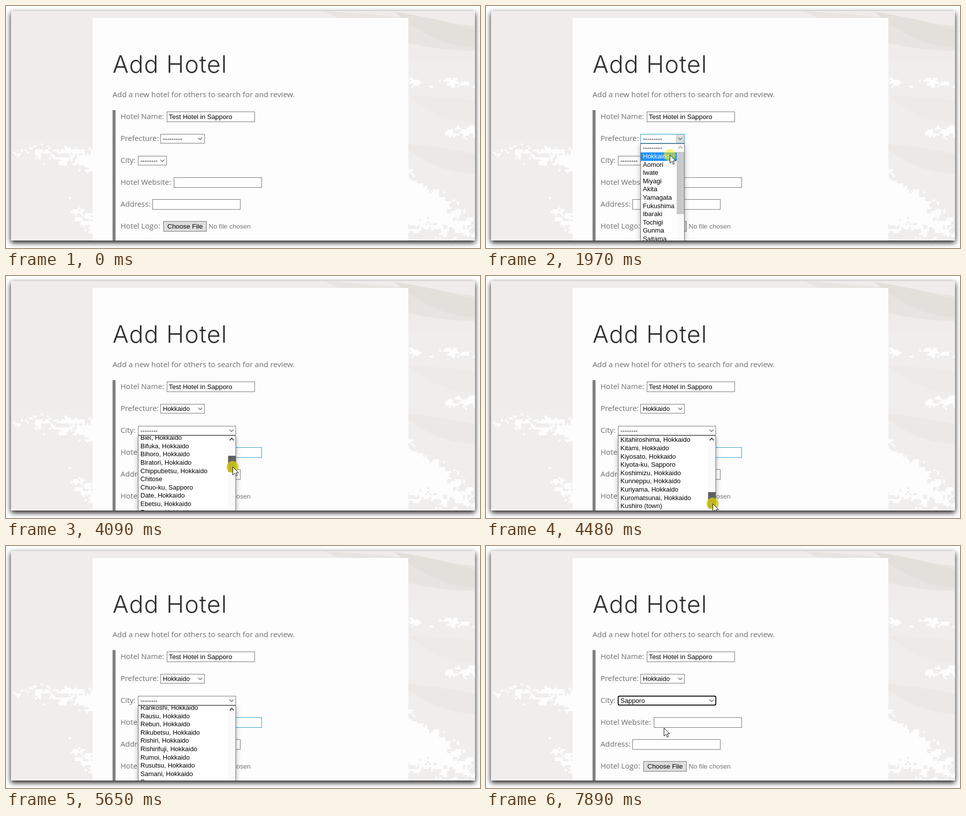
Write an HTML page with a canvas that moves like this. It is 952 px wide and 486 px high and loops after 8000 ms.

```html
<!DOCTYPE html>
<html lang="en">
<head>
<meta charset="utf-8">
<title>Add Hotel</title>
<style>
html, body { margin: 0; width: 100%; height: 100%; overflow: hidden; background: #fff; }
canvas { display: block; width: 952px; height: 486px; }
</style>
</head>
<body>
<canvas id="stage" width="952" height="486"></canvas>
<script>
const W = 952, H = 486, LOOP = 8000;
const ctx = document.getElementById('stage').getContext('2d');
const ARIAL = '"Liberation Sans", Arial, sans-serif';
const UI = '13.333px ' + ARIAL, LIST = '13px ' + ARIAL;
const BODY = '"Open Sans", "Noto Sans", sans-serif';
const ROW = 16.6, SHOWN = 20, BOTTOM = 471;
const BORDER = '#767676', HOVER = '#3399cc', PICK = '#1e90ff';

const prefectures = ('---------,Hokkaido,Aomori,Iwate,Miyagi,Akita,Yamagata,Fukushima,' +
  'Ibaraki,Tochigi,Gunma,Saitama,Chiba').split(',');

// A trailing dot marks a name shown without its region.
const cities = ('--------.,Abashiri.,Abira,Aibetsu,Akabira,Akaigawa,Akkeshi,Asahikawa.,Ashibetsu,' +
  'Ashoro,Assabu,Atsubetsu-ku,Atsuma,Betsukai,Bibai,Biei,Bifuka,Bihoro,Biratori,Chippubetsu,' +
  'Chitose.,Chuo-ku,Date,Ebetsu,Engaru,Eniwa,Erimo,Esashi,Fukagawa,Fukushima,Furano,Furubira,' +
  'Haboro,Hakodate.,Hamanaka,Hamatonbetsu,Hidaka,Higashi-ku,Higashikagura,Higashikawa,Hiroo,' +
  'Hokuryu,Hokuto,Honbetsu,Horokanai,Horonobe,Ikeda,Imakane,Ishikari,Iwamizawa,Iwanai,' +
  'Kamifurano,Kamikawa,Kaminokuni,Kamishihoro,Kamisunagawa,Kamoenai,Kembuchi,Kikonai,Kimobetsu,' +
  'Kita-ku,Kitahiroshima,Kitami,Kiyosato,Kiyota-ku,Koshimizu,Kunneppu,Kuriyama,Kuromatsunai,' +
  'Kushiro (town).,Kushiro.,Kutchan,Kyogoku,Kyowa,Makkari,Mashike,Matsumae,Memuro,Mikasa,' +
  'Minami-ku,Minamifurano,Mombetsu,Mori,Moseushi,Mukawa,Muroran.,Naganuma,Naie,Nakafurano,' +
  'Nakagawa,Nakasatsunai,Nakashibetsu,Nakatombetsu,Namporo,Nanae,Nayoro,Nemuro,Niikappu,Niki,' +
  'Niseko,Nishi-ku,Nishiokoppe,Noboribetsu,Numata,Obihiro,Obira,Oketo,Okoppe,Okushiri,omu,' +
  'Oshamambe,Otaru.,Otobe,Otofuke,Otoineppu,Ozora,Pippu,Rankoshi,Rausu,Rebun,Rikubetsu,' +
  'Rishiri,Rishirifuji,Rumoi,Rusutsu,Samani,Sapporo.,Sarabetsu,Saroma,Sarufutsu,Setana,' +
  'Shakotan,Shari,Shibecha,Shibetsu').split(',').map(c =>
    c.endsWith('.') ? c.slice(0, -1) : c + (c.endsWith('-ku') ? ', Sapporo' : ', Hokkaido'));
const cityRow = name => cities.findIndex(c => c.startsWith(name));
const CITY_COUNT = 187;

const tickAt = t => t < 400 ? 0 : Math.floor((t - 390) / 131.4) + 1;

// Key points: tick, then the values reached there
const cursorIn = [[1, 665, 448], [6, 373, 265], [10, 369, 289], [13, 369, 299], [16, 369, 299],
  [19, 472, 309], [20, 455, 312], [21, 455, 312], [28, 455, 359]];
const cursorOut = [[49, 257, 433], [53, 284, 372], [57, 284, 372], [58, 357, 365]];
const scrolling = [[28, 0], [32, cityRow('Kitahiroshima')], [37, cityRow('Obira') - .36],
  [43, cityRow('Rusutsu') - .42]];

function along(keys, n, col = 1) {
  const i = keys.findIndex(k => k[0] >= n);
  if (i < 0) return keys[keys.length - 1][col];
  if (i === 0) return keys[0][col];
  const a = keys[i - 1], b = keys[i];
  return a[col] + (b[col] - a[col]) * (n - a[0]) / (b[0] - a[0]);
}

const thumbShift = scroll => 268 * scroll / (CITY_COUNT - SHOWN);

function cursorAt(n) {
  if (n < 1) return null;
  if (n <= 28) return [along(cursorIn, n), along(cursorIn, n, 2)];
  if (n < 49) return n < 36 ? [455, 359 + thumbShift(along(scrolling, n))] : null;
  return [along(cursorOut, n), along(cursorOut, n, 2)];
}

function box(c, x, y, w, h, fill, line) {
  c.fillStyle = fill;
  c.fillRect(x, y, w, h);
  if (!line) return;
  c.strokeStyle = line;
  c.lineWidth = 1;
  c.strokeRect(x + .5, y + .5, w - 1, h - 1);
}

function text(c, str, x, y, font = UI, color = '#000') {
  c.font = font;
  c.fillStyle = color;
  c.fillText(str, x, y);
}

function chevron(x, y, dir, color, width = 1.5) {
  ctx.strokeStyle = color;
  ctx.lineWidth = width;
  ctx.beginPath();
  ctx.moveTo(x - 4, y - 2 * dir);
  ctx.lineTo(x, y + 2 * dir);
  ctx.lineTo(x + 4, y - 2 * dir);
  ctx.stroke();
}

function hash(x, y) {
  const s = Math.sin(x * 127.1 + y * 311.7) * 43758.5453;
  return s - Math.floor(s);
}

const bell = (d, s) => Math.exp(-((d / s) ** 2));

// How much white paint shows through on each side of the form
function paint(x, y) {
  if (x < 174) {
    const u = (x - 10) / 164;
    return bell(y - 285 - 25 * u, 27) * (.4 + .55 * u) + u * u * bell(y - 320 - 115 * u, 34);
  }
  const v = (x - 808) / 134;
  return .6 * bell(y - 152, 14) + v * bell(y - 252, 17) +
    (1.25 - .6 * v) * bell(y - 390 - 55 * v, 64 - 26 * v);
}

// A soft brush band running from the left x to the window's right edge
function band(c, x, y, drop, thick, color) {
  c.fillStyle = color;
  c.beginPath();
  c.moveTo(x, y);
  c.quadraticCurveTo((x + 942) / 2, y + drop * .3, 942, y + drop);
  c.lineTo(942, y + drop + thick);
  c.quadraticCurveTo((x + 942) / 2, y + drop + thick, x, y);
  c.fill();
}

function wall(c) {
  box(c, 0, 0, W, H, '#efeceb');
  box(c, 10, 270, 164, 201, '#f0eeed');
  box(c, 808, 110, 134, 361, '#f0eeed');
  band(c, 640, 10, 30, 50, '#e8e4e1');
  band(c, 780, 12, 36, 34, '#e3dfdb');
  band(c, 808, 180, 10, 45, '#edeae8');
  band(c, 790, 275, 22, 40, '#ebe8e6');
  for (let y = 120; y < BOTTOM; y += 4) {
    for (let x = 10; x < 942; x += 4) {
      if (x > 174 && x < 804) continue;
      const clump = hash(Math.floor((x + y / 3) / 14), Math.floor(y / 8));
      if (paint(x, y) > .25 + .25 * hash(x, y) + .5 * clump) box(c, x, y, 4, 4, '#fdfdfd');
    }
  }
}

function makePage() {
  const page = document.createElement('canvas');
  page.width = W;
  page.height = H;
  const c = page.getContext('2d');
  box(c, 0, 0, W, H, '#fff');
  c.save();
  c.shadowColor = 'rgba(0,0,0,.95)';
  c.shadowBlur = 10;
  c.shadowOffsetY = 3.5;
  box(c, 10, 10, 932, 461, '#555');
  c.restore();

  c.save();
  c.beginPath();
  c.rect(10, 10, 932, 461);
  c.clip();
  wall(c);
  box(c, 174, 24, 634, 447, '#fdfdfd');
  box(c, 214, 209, 6, 262, '#808080');
  c.restore();

  c.letterSpacing = '1.15px';
  text(c, 'Add Hotel', 214, 134, '300 48px Inter, Lato, sans-serif', '#303030');
  c.letterSpacing = '0px';
  const gray = '#6d6d6d';
  text(c, 'Add a new hotel for others to search for and review.', 214, 183, '15.2px ' + BODY, gray);
  ['Hotel Name:', 'Prefecture:', 'City:', 'Hotel Website:', 'Address:', 'Hotel Logo:']
    .forEach((s, i) => text(c, s, 230, 227 + 44 * i, '15px ' + BODY, gray));
  box(c, 323, 212, 177, 21, '#fff', BORDER);
  text(c, 'Test Hotel in Sapporo', 327, 227);
  box(c, 294, 388, 177, 21, '#fff', BORDER);
  box(c, 316, 432, 87, 21, '#dedede', BORDER);
  text(c, 'Choose File', 324, 447);
  text(c, 'No file chosen', 407, 447, UI, '#757575');
  return page;
}

function select(x, y, w, value, { ring, line = BORDER, lit }) {
  box(ctx, x, y, w, 19, '#fff', line);
  if (lit) box(ctx, x + w - 18, y + 1, 17, 17, '#dcdcdc');
  text(ctx, value, x + 5, y + 14, LIST);
  chevron(x + w - 9, y + 9.5, 1, '#707070');
  if (!ring) return;
  ctx.strokeStyle = '#101010';
  ctx.lineWidth = 2;
  ctx.beginPath();
  ctx.roundRect(x + .5, y + .5, w - 1, 18, 3);
  ctx.stroke();
}

function popup(x, y, w, rows, { scroll, pick, count, shift, held }) {
  const h = SHOWN * ROW + 2, bar = x + w - 16, top = y + 1;
  ctx.save();
  ctx.beginPath();
  ctx.rect(10, y, 932, BOTTOM - y);
  ctx.clip();
  ctx.save();
  ctx.shadowColor = 'rgba(0,0,0,.3)';
  ctx.shadowBlur = 10;
  ctx.shadowOffsetY = 3;
  box(ctx, x, y, w, h, '#fff');
  ctx.restore();
  box(ctx, x, y, w, h, '#fefefe', '#6b6b6b');

  ctx.beginPath();
  ctx.rect(x + 1, top, w - 2, h);
  ctx.clip();
  rows.forEach((name, i) => {
    const ry = top + (i - scroll) * ROW;
    if (ry < y - ROW || ry > BOTTOM) return;
    if (i === pick) box(ctx, x + 1, Math.round(ry), w - 17, 17, PICK);
    text(ctx, name, x + 5, Math.round(ry + 12.4), LIST, i === pick ? '#fff' : '#000');
  });
  box(ctx, bar, top, 15, h, '#fafafa');
  chevron(bar + 7.5, top + 7, -1, scroll > 0 ? '#505050' : '#b4b4b4', 2);
  const size = Math.round(299 * SHOWN / count);
  box(ctx, bar, Math.round(top + 15.6 + shift), 15, size, held ? '#606060' : '#c9c9c9');
  ctx.restore();
}

function halo(x, y, color) {
  ctx.fillStyle = color;
  ctx.beginPath();
  ctx.arc(x, y, 12, 0, 7);
  ctx.fill();
}

function arrow(x, y) {
  const shape = [0, 0, 0, 16, 4, 12.5, 6.6, 18.4, 9, 17.3, 6.5, 11.6, 11.5, 11.6];
  ctx.beginPath();
  for (let i = 0; i < shape.length; i += 2) ctx.lineTo(x + .5 + shape[i], y + .5 + shape[i + 1]);
  ctx.closePath();
  ctx.fillStyle = '#fff';
  ctx.fill();
  ctx.strokeStyle = '#111';
  ctx.lineWidth = 1;
  ctx.stroke();
}

function cityPick(n, scroll, pos) {
  if (n < 44) return 0;
  if (!pos || pos[0] < 266) return cityRow('Shari');
  return Math.floor((pos[1] - 321) / ROW + scroll);
}

const page = makePage();

function draw(n) {
  const between = (a, b) => n >= a && n <= b;
  const pos = cursorAt(n);
  ctx.drawImage(page, 0, 0);

  const prefLit = between(5, 13);
  select(310, 257, 89, n < 14 ? '---------' : 'Hokkaido',
    { ring: between(14, 20), line: prefLit ? HOVER : BORDER, lit: prefLit });
  select(265, 301, n < 15 ? 58 : 197, n < 54 ? '--------' : 'Sapporo',
    { ring: n >= 54, lit: between(19, 21) });
  const siteLit = between(23, 48) || between(54, 55);
  box(ctx, 337, 344, 177, 21, '#fff', siteLit ? HOVER : BORDER);

  if (between(7, 13)) {
    popup(310, 276, 89, prefectures, { scroll: 0, pick: n < 12 ? 0 : 1, count: 48, shift: 0 });
  }
  if (between(21, 53)) {
    const scroll = along(scrolling, n);
    popup(265, 320, 197, cities, {
      scroll, pick: cityPick(n, scroll, pos), count: CITY_COUNT,
      shift: thumbShift(scroll), held: between(27, 44)
    });
  }

  if (!pos) return;
  ctx.save();
  ctx.beginPath();
  ctx.rect(10, 10, 932, BOTTOM - 10);
  ctx.clip();
  if (between(27, 35)) halo(pos[0], pos[1], 'rgba(214,204,20,.82)');
  else if ([6, 13, 20, 53].includes(n)) halo(pos[0], pos[1] + .5, 'rgba(255,240,0,.55)');
  arrow(...pos.map(Math.round));
  ctx.restore();
}

let last = -1;
function frame(now) {
  const n = tickAt(now % LOOP);
  if (n !== last) draw(last = n);
  requestAnimationFrame(frame);
}
draw(0);
requestAnimationFrame(frame);
</script>
</body>
</html>
```
